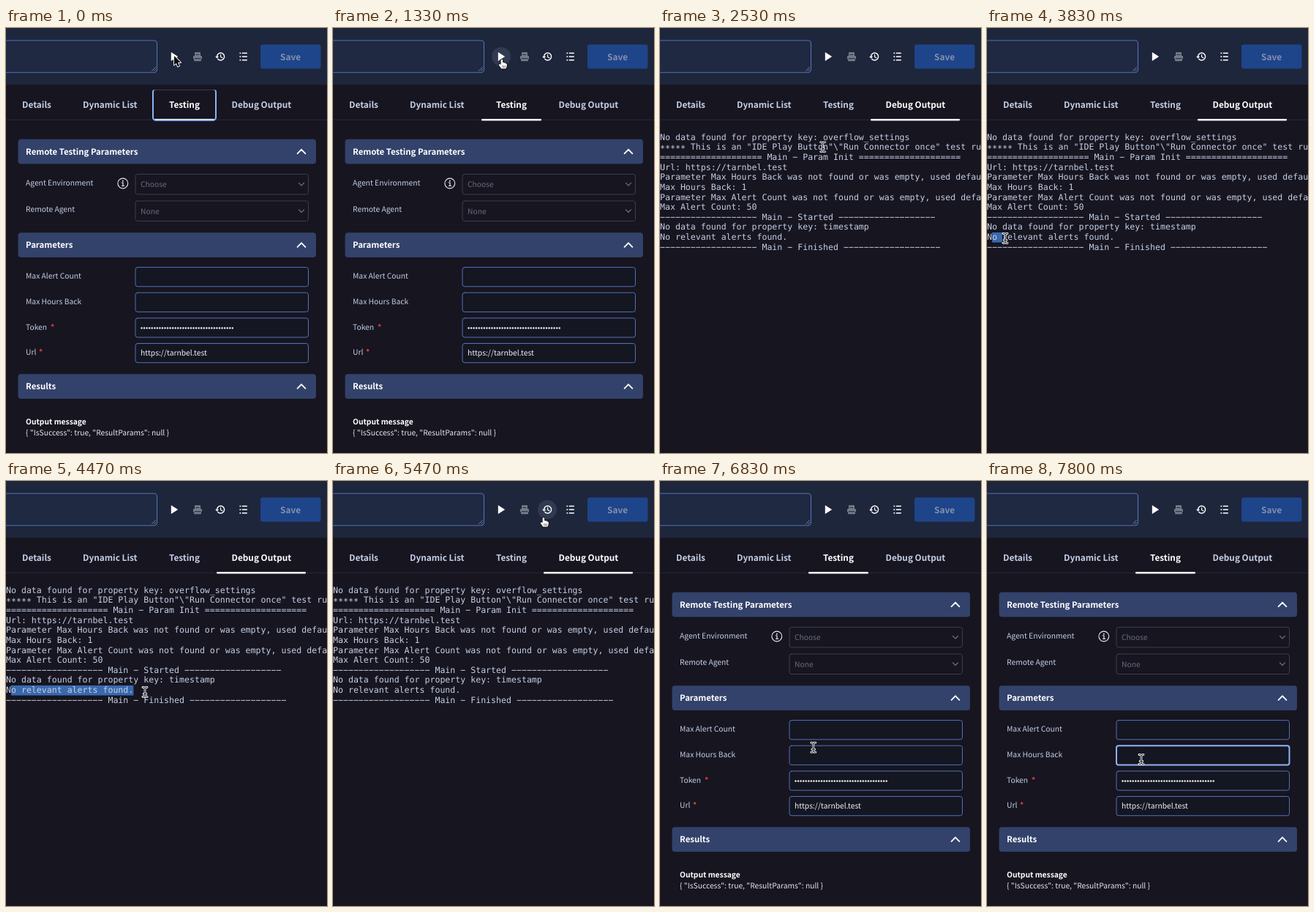
An HTML page with a canvas that plays this animation: 439x580 px, repeating every 8 s.

```html
<!DOCTYPE html>
<html lang="en">
<head>
<meta charset="utf-8">
<title>Connector testing</title>
<style>
html, body { margin: 0; width: 100%; height: 100%; overflow: hidden; background: #171520; }
canvas { display: block; width: 439px; height: 580px; }
</style>
</head>
<body>
<canvas id="stage"></canvas>
<script>
const W = 439, H = 580, LOOP = 8000;
const canvas = document.getElementById('stage');
const ctx = canvas.getContext('2d');
const dpr = window.devicePixelRatio || 1;
canvas.width = W * dpr;
canvas.height = H * dpr;

const SANS = '"Noto Sans CJK JP", "Noto Sans CJK SC", "Noto Sans", sans-serif';
const BODY = `10.3px ${SANS}`;
const BOLD = `bold 10.3px ${SANS}`;
const HEAD = `bold 11.4px ${SANS}`;
const TAB = `bold 11.8px ${SANS}`;
const MONO = '11.585px "DejaVu Sans Mono", monospace';
const CHAR = 6.975;

const TEXT = [195, 207, 229], WHITE = [255, 255, 255];
const BG = '#171520', BAR = '#1e263b', PANEL = '#32426a';
const EDGE = '#5272b3', FOCUS = '#8db4f6', DIM = '#3b3e4e', DIM_TEXT = '#666c7f';

const clamp = v => Math.max(0, Math.min(1, v));
const fade = (t, a, b) => clamp((t - a) / (b - a));
const rgb = c => `rgb(${c.map(Math.round).join(',')})`;
const mix = (a, b, k) => rgb(a.map((v, i) => v + (b[i] - v) * k));

const ease = {
  hold: () => 0,
  line: k => k,
  in: k => k * k,
  out: k => 1 - (1 - k) * (1 - k),
  both: k => k * k * (3 - 2 * k)
};

// time, x, y of the pointer, and the easing towards the next point
const PATH = [
  [0, 230, 38, 'hold'], [900, 231, 43, 'hold'], [1330, 231, 43, 'both'],
  [1930, 350, 110, 'hold'], [2130, 350, 110, 'in'], [2530, 223, 162, 'line'],
  [2870, 104, 270, 'out'], [3430, 8, 287, 'hold'], [3700, 8, 287, 'in'],
  [3830, 25, 287, 'both'], [4450, 190, 288, 'hold'], [5000, 190, 288, 'both'],
  [5330, 288, 50, 'hold'], [5470, 288, 50, 'both'], [5870, 244, 111, 'hold'],
  [6200, 244, 111, 'both'], [6930, 208, 377, 'line'], [7030, 211, 380, 'hold'],
  [LOOP, 211, 380, 'hold']
];

const dashes = '\u2212'.repeat(19), rule = '='.repeat(20);
const LOG = [
  'No data found for property key: overflow_settings',
  '\u2217\u2217\u2217\u2217\u2217 This is an "IDE Play Button"\\"Run Connector once" test run',
  `${rule} Main \u2212 Param Init ${rule}`,
  'Url: https://tarnbel.test',
  'Parameter Max Hours Back was not found or was empty, used default',
  'Max Hours Back: 1',
  'Parameter Max Alert Count was not found or was empty, used default',
  'Max Alert Count: 50',
  `${dashes} Main \u2212 Started ${dashes}`,
  'No data found for property key: timestamp',
  'No relevant alerts found.',
  `${dashes} Main \u2212 Finished ${dashes}`
];

function pointer(t) {
  let i = 0;
  while (i < PATH.length - 2 && t >= PATH[i + 1][0]) i++;
  const [t0, x0, y0, kind] = PATH[i], [t1, x1, y1] = PATH[i + 1];
  const k = ease[kind](clamp((t - t0) / (t1 - t0)));
  return { x: x0 + (x1 - x0) * k, y: y0 + (y1 - y0) * k };
}

function text(str, x, y, font, color) {
  ctx.font = font;
  ctx.fillStyle = color;
  ctx.fillText(str, x, y);
}

function box(x, y, w, h, r, fill, stroke, width = 1) {
  ctx.beginPath();
  ctx.roundRect(x, y, w, h, r);
  if (fill) { ctx.fillStyle = fill; ctx.fill(); }
  if (stroke) { ctx.strokeStyle = stroke; ctx.lineWidth = width; ctx.stroke(); }
}

function trace(...p) {
  ctx.beginPath();
  for (let i = 0; i < p.length; i += 2) ctx.lineTo(p[i], p[i + 1]);
}

function line(color, width, ...p) {
  trace(...p);
  ctx.strokeStyle = color;
  ctx.lineWidth = width;
  ctx.stroke();
}

function disc(x, y, r, color) {
  ctx.beginPath();
  ctx.arc(x, y, r, 0, 7);
  ctx.fillStyle = color;
  ctx.fill();
}

function halo(x, alpha) {
  ctx.globalAlpha = alpha;
  disc(x, 39, 13, '#303a51');
  ctx.globalAlpha = 1;
}

function toolbar(t) {
  ctx.fillStyle = BAR;
  ctx.fillRect(0, 0, W, 77.5);
  box(-10, 17, 216.5, 43.7, 4, '#1f2942', EDGE, 1.1);
  line('#8a96b0', 0.8, 199.5, 58.5, 204.5, 53.5);
  line('#8a96b0', 0.8, 202.5, 58.5, 204.5, 56.5);

  halo(230, fade(t, 900, 1130) * (1 - fade(t, 1400, 1600)));
  halo(293, fade(t, 5220, 5330) * (1 - fade(t, 5480, 5700)));

  trace(225.8, 33, 235.2, 39, 225.8, 45);
  ctx.fillStyle = '#fff';
  ctx.fill();

  const grey = '#747a88';
  box(258, 33, 8, 6, 1, grey);
  box(256, 38, 12, 4.6, 1, grey);
  box(257, 42.2, 10, 3, 1, grey);
  line(BAR, 0.9, 259.5, 36.3, 264, 36.3);
  line(BAR, 0.9, 258, 41.6, 266, 41.6);

  ctx.beginPath();
  ctx.arc(293.6, 39, 5, Math.PI, Math.PI * 2.78);
  ctx.strokeStyle = '#fff';
  ctx.lineWidth = 1.4;
  ctx.stroke();
  trace(286, 38.8, 291.2, 38.8, 288.6, 41.6);
  ctx.fillStyle = '#fff';
  ctx.fill();
  line('#fff', 1.1, 293.6, 36.2, 293.6, 39.4, 296, 40.8);

  for (const y of [34.3, 39, 43.7]) {
    ctx.fillStyle = '#fff';
    ctx.fillRect(319.5, y - 0.8, 1.7, 1.7);
    ctx.fillRect(322.8, y - 0.7, 7, 1.5);
  }

  box(348, 22.5, 82.5, 33, 3, '#1e448a');
  text('Save', 375, 43.5, `bold 11.9px ${SANS}`, '#8290ac');
}

function tabs(t, debug) {
  const test = t < 3000 ? 1 - fade(t, 2070, 2270) : fade(t, 5740, 5860);
  const dbg = fade(t, 1720, 1850) * (1 - fade(t, 6140, 6400));
  ctx.fillStyle = '#292c3d';
  ctx.fillRect(0, 124.8, W, 1);
  text('Details', 22, 109, TAB, rgb(TEXT));
  text('Dynamic List', 105, 109, TAB, rgb(TEXT));
  text('Testing', 223, 109, TAB, mix(TEXT, WHITE, test));
  text('Debug Output', 308.5, 109, TAB, mix(TEXT, WHITE, dbg));
  if (debug) box(288, 124, 122, 2.6, 1, '#fff');
  else box(203, 124, 82, 2.6, 1, '#fff');
  if (t < 70) {
    ctx.save();
    ctx.beginPath();
    ctx.rect(190, 84.5, 110, 50);
    ctx.clip();
    box(201, 83.5, 86, 42.5, 4, null, FOCUS, 2);
    ctx.restore();
  }
}

function section(title, y) {
  box(16.5, y, 407.5, 33.8, 4, PANEL);
  text(title, 27, y + 21, HEAD, '#fff');
  line('#fff', 1.9, 398.6, y + 19.5, 404, y + 14, 409.4, y + 19.5);
}

function select(label, value, y, base) {
  text(label, 27, base, BODY, rgb(TEXT));
  box(177, y, 236.5, 27.5, 3, null, DIM);
  text(value, 184, y + 17.6, BODY, DIM_TEXT);
  line(DIM_TEXT, 1.2, 400.5, y + 12, 404, y + 15.5, 407.5, y + 12);
}

function input(label, y, focused) {
  text(label, 27, y + 15.8, BODY, rgb(TEXT));
  box(177, y, 236.5, 26.2, 3, '#141622', focused ? FOCUS : EDGE, focused ? 2 : 1);
}

function testing(t) {
  section('Remote Testing Parameters', 151.8);
  select('Agent Environment', 'Choose', 199.5, 215.2);
  select('Remote Agent', 'None', 236, 251);
  ctx.beginPath();
  ctx.arc(159.8, 212, 6.9, 0, 7);
  ctx.strokeStyle = '#e6eaf3';
  ctx.lineWidth = 1.1;
  ctx.stroke();
  disc(159.8, 208.7, 1, '#e6eaf3');
  line('#e6eaf3', 1.2, 158.3, 211, 160, 211, 160, 215.4);
  line('#e6eaf3', 1, 158, 215.4, 161.8, 215.4);

  section('Parameters', 279.3);
  input('Max Alert Count', 326.6, false);
  input('Max Hours Back', 361.2, t >= 7170);
  input('Token', 395.9, false);
  input('Url', 430.5, false);
  text('*', 61, 411.8, BOLD, '#e5423c');
  text('*', 45, 446.4, BOLD, '#e5423c');
  for (let i = 0; i < 36; i++) disc(185.5 + i * 3.55, 409.6, 1.25, '#eef1f7');
  text('https://tarnbel.test', 184, 447.4, BODY, '#eef1f7');
  if (t >= 7170 && t < 7670) line('#fff', 1, 184.5, 368, 184.5, 380.5);

  section('Results', 472.3);
  text('Output message', 27, 541, BOLD, '#fff');
  text('{ "IsSuccess": true, "ResultParams": null }', 27, 555.8, BODY, '#e1e6f0');
}

function log(t, p) {
  if (t >= 3730 && t < 4570) {
    const end = Math.max(1, Math.min(25, Math.round((p.x - 4) / CHAR)));
    ctx.fillStyle = '#3969ad';
    ctx.fillRect(CHAR, 279, (end - 1) * CHAR, 13.6);
  }
  LOG.forEach((row, i) => text(row, 0, 152.7 + i * 13.64, MONO, rgb(TEXT)));
}

function shape(p, fill, edge) {
  trace(...p);
  ctx.closePath();
  ctx.lineWidth = 1.8;
  ctx.strokeStyle = edge;
  ctx.stroke();
  ctx.fillStyle = fill;
  ctx.fill();
}

function hand() {
  ctx.beginPath();
  ctx.moveTo(-1.4, 7);
  ctx.lineTo(-1.4, 0.8);
  ctx.quadraticCurveTo(0, -1.2, 1.2, 0.8);
  ctx.lineTo(1.2, 4.2);
  ctx.quadraticCurveTo(2.8, 3.4, 3.4, 4.8);
  ctx.quadraticCurveTo(4.9, 4.2, 5.3, 5.6);
  ctx.quadraticCurveTo(7, 5.4, 6.9, 7.2);
  ctx.quadraticCurveTo(6.8, 10, 5.4, 12.6);
  ctx.lineTo(-0.8, 12.6);
  ctx.quadraticCurveTo(-2, 10.2, -4.2, 8);
  ctx.quadraticCurveTo(-4.6, 5.8, -2.6, 6.2);
  ctx.closePath();
  ctx.strokeStyle = '#08090d';
  ctx.lineWidth = 1.6;
  ctx.stroke();
  ctx.fillStyle = '#fff';
  ctx.fill();
  for (const x of [0.8, 2.6, 4.4]) line('#20222b', 0.6, x, 8.4, x, 11);
}

function beam() {
  for (const [color, width] of [['#e8ebf1', 2.8], ['#14151b', 1]]) {
    line(color, width, -3, -6.5, -1.4, -6.5, 0, -5.2, 1.4, -6.5, 3, -6.5);
    line(color, width, -3, 6.5, -1.4, 6.5, 0, 5.2, 1.4, 6.5, 3, 6.5);
    line(color, width, 0, -5.2, 0, 5.2);
    line(color, width, -1.8, 2.5, 1.8, 2.5);
  }
}

function arrow() {
  shape([0, 0, 0, 12.6, 2.9, 9.9, 4.9, 14.6, 7, 13.7, 5, 9.1, 9, 9.1], '#08090d', '#fff');
}

function kind(t, { x, y }, debug) {
  if (t < 900) return arrow;
  if (y < 77) {
    const over = c => Math.hypot(x - c, y - 39) < 13.5;
    return over(230) || over(293) ? hand : arrow;
  }
  if (y < 126) return x > 203 && x < 410 ? hand : arrow;
  if (debug) return beam;
  const within = (a, b) => y > a && y < b;
  if (within(152, 186) || within(279, 313)) return hand;
  return within(326, 388) ? beam : arrow;
}

function draw(t) {
  const p = pointer(t), debug = t >= 2070 && t < 6130;
  ctx.setTransform(dpr, 0, 0, dpr, 0, 0);
  ctx.textRendering = 'geometricPrecision';
  ctx.lineCap = ctx.lineJoin = 'round';
  ctx.fillStyle = BG;
  ctx.fillRect(0, 0, W, H);
  toolbar(t);
  tabs(t, debug);
  if (debug) log(t, p); else testing(t);
  ctx.translate(p.x, p.y);
  kind(t, p, debug)();
}

const start = performance.now();
function tick(now) {
  draw(Math.max(0, now - start) % LOOP);
  requestAnimationFrame(tick);
}
draw(0);
requestAnimationFrame(tick);
</script>
</body>
</html>
```
